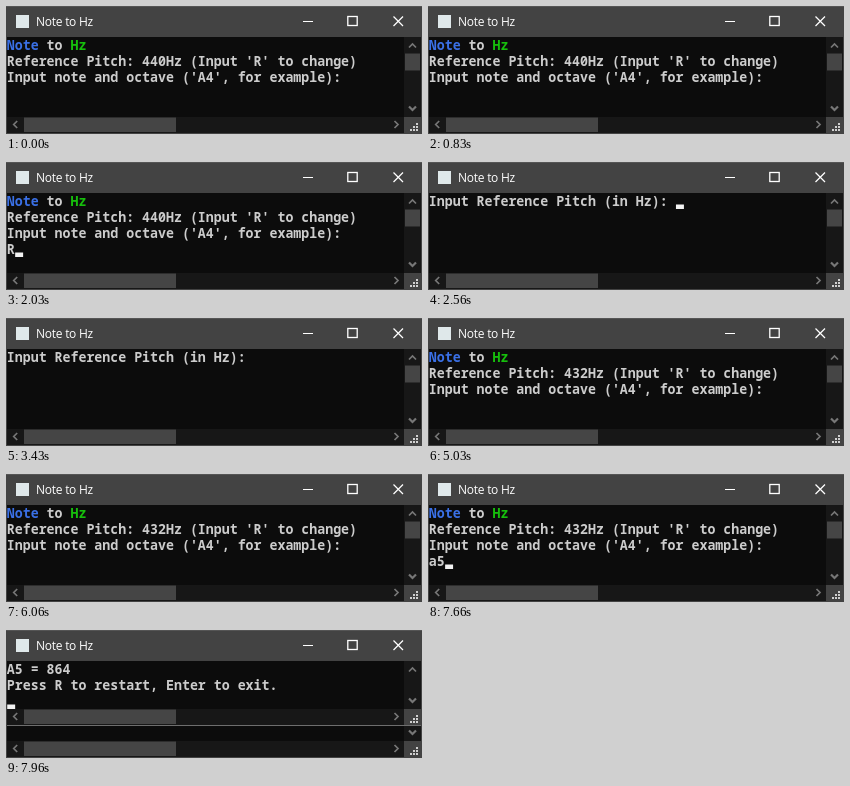
These frames come from a looping animation (416 by 128 pixels, 8000 ms). An HTML page with a canvas:

```html
<!DOCTYPE html>
<html lang="en">
<head>
<meta charset="utf-8">
<title>Note to Hz</title>
<style>
html, body { margin: 0; width: 100%; height: 100%; overflow: hidden; background: #0c0c0c; }
canvas { display: block; }
</style>
</head>
<body>
<canvas id="stage" width="416" height="128"></canvas>
<script>
const ctx = document.getElementById('stage').getContext('2d');
const LOOP = 8000;
const CELL = 7.96, ROW = 16, LEFT = 0.8, TOP = 31;
const BLACK = '#0c0c0c', BAR = '#434343', TRACK = '#171717', THUMB = '#454545';
const GREY = '#cccccc', BLUE = '#3a70e6', GREEN = '#16be0c', WHITE = '#f2f2f2';

// A screen is a list of runs: [row, column, text, colour]
const menu = pitch => [
  [0, 0, 'Note', BLUE], [0, 5, 'to', GREY], [0, 8, 'Hz', GREEN],
  [1, 0, `Reference Pitch: ${pitch}Hz (Input 'R' to change)`, GREY],
  [2, 0, "Input note and octave ('A4', for example):", GREY]
];
const first = menu(440), second = menu(432), blank = [];
const ask = [[0, 0, 'Input Reference Pitch (in Hz):', GREY]];
const result = [
  [0, 0, 'A5 = 864', GREY],
  [1, 0, 'Press R to restart, Enter to exit.', GREY]
];

// Steps: [start ms, screen, typed text, typed at [row, column], cursor [row, column] or null]
const line = [3, 0], field = [0, 31];
const steps = [
  [0, first, '', line, null],
  [260, first, '', line, [3, 0]],
  [760, first, '', line, null],
  [1330, first, '', line, [3, 0]],
  [1830, first, '', line, null],
  [2000, first, 'R', line, null],
  [2030, first, 'R', line, [3, 1]],
  [2360, first, 'R', line, [4, 0]],
  [2400, blank, '', line, [0, 0]],
  [2430, ask, '', field, [0, 31]],
  [3430, ask, '', field, null],
  [3630, ask, '4', field, [0, 32]],
  [3800, ask, '43', field, [0, 33]],
  [3960, ask, '432', field, [0, 34]],
  [4300, ask, '432', field, [1, 0]],
  [4330, blank, '', line, [1, 0]],
  [4400, second, '', line, null],
  [4430, second, '', line, [3, 0]],
  [5030, second, '', line, null],
  [5560, second, '', line, [3, 0]],
  [6030, second, '', line, null],
  [6630, second, '', line, [3, 0]],
  [7100, second, 'a', line, [3, 1]],
  [7660, second, 'a5', line, [3, 2]],
  [7960, result, '', line, [2, 0]]
];

function box(x, y, w, h, color) {
  ctx.fillStyle = color;
  ctx.fillRect(x, y, w, h);
}

function stroke(points, color, width) {
  ctx.strokeStyle = color;
  ctx.lineWidth = width;
  ctx.beginPath();
  points.forEach(([x, y]) => ctx.lineTo(x, y));
  ctx.stroke();
}

// Arrow head pointing along (dx, dy)
function chevron(x, y, dx, dy, width = 1.7) {
  const at = (along, side) => [x + dx * along - dy * side, y + dy * along + dx * side];
  stroke([at(-1.5, -3.5), at(2, 0), at(-1.5, 3.5)], '#777777', width);
}

function titleBar() {
  box(0, 0, 416, 31, BAR);
  box(0, 0, 416, 1, '#555555');
  box(10, 9, 13, 13, '#dfe8ea');
  ctx.font = '12px "Open Sans", sans-serif';
  ctx.letterSpacing = '-0.25px';
  ctx.fillStyle = '#ffffff';
  ctx.fillText('Note to Hz', 30, 20);
  ctx.letterSpacing = '0px';
  box(297, 15, 10, 1, '#ffffff');
  ctx.strokeStyle = '#ffffff';
  ctx.lineWidth = 1.3;
  ctx.strokeRect(341.8, 10.5, 9.4, 9);
  stroke([[387.5, 10.5], [397, 20]], '#ffffff', 1.3);
  stroke([[397, 10.5], [387.5, 20]], '#ffffff', 1.3);
}

function bottomBar(y) {
  box(1, y, 397, 16, TRACK);
  box(18, y + 0.5, 152, 14.5, THUMB);
  chevron(9.7, y + 7.5, -1, 0);
  chevron(390, y + 7.5, 1, 0);
  box(398, y, 17, 16, BAR);
  for (let i = 0; i < 3; i++)
    for (let j = 2 - i; j < 3; j++)
      box(404 + j * 3, y + 6 + i * 3, 2, 2, '#d0d0d0');
}

function write(row, col, text, color) {
  ctx.font = 'bold 13.27px "Noto Sans Mono", monospace';
  ctx.fillStyle = color;
  [...text].forEach((ch, i) =>
    ctx.fillText(ch, LEFT + (col + i) * CELL, TOP + row * ROW + 13));
}

function draw(now) {
  const t = now % LOOP;
  const [, screen, typed, at, cursor] = steps.findLast(s => s[0] <= t);

  box(0, 0, 416, 128, BLACK);
  screen.forEach(run => write(...run));
  write(...at, typed, GREY);
  if (cursor)
    box(LEFT + 0.4 + cursor[1] * CELL, TOP + cursor[0] * ROW + 11.5, CELL, 4.5, WHITE);

  box(398, 31, 17, 80, TRACK);
  chevron(406.5, 40, 0, -1);
  chevron(406.5, 102, 0, 1, 2.2);
  if (screen === result) {
    chevron(406.5, 70, 0, 1, 2.2);
    bottomBar(79);
    box(0, 95, 416, 1, '#6e6e6e');
  } else {
    box(399, 47.5, 15, 17, THUMB);
  }
  bottomBar(111);
  titleBar();
  box(0, 31, 1, 97, BAR);
  box(415, 31, 1, 97, BAR);
  box(0, 127, 416, 1, BAR);
}

const start = performance.now();
function tick() {
  draw(performance.now() - start);
  requestAnimationFrame(tick);
}
tick();
</script>
</body>
</html>
```
